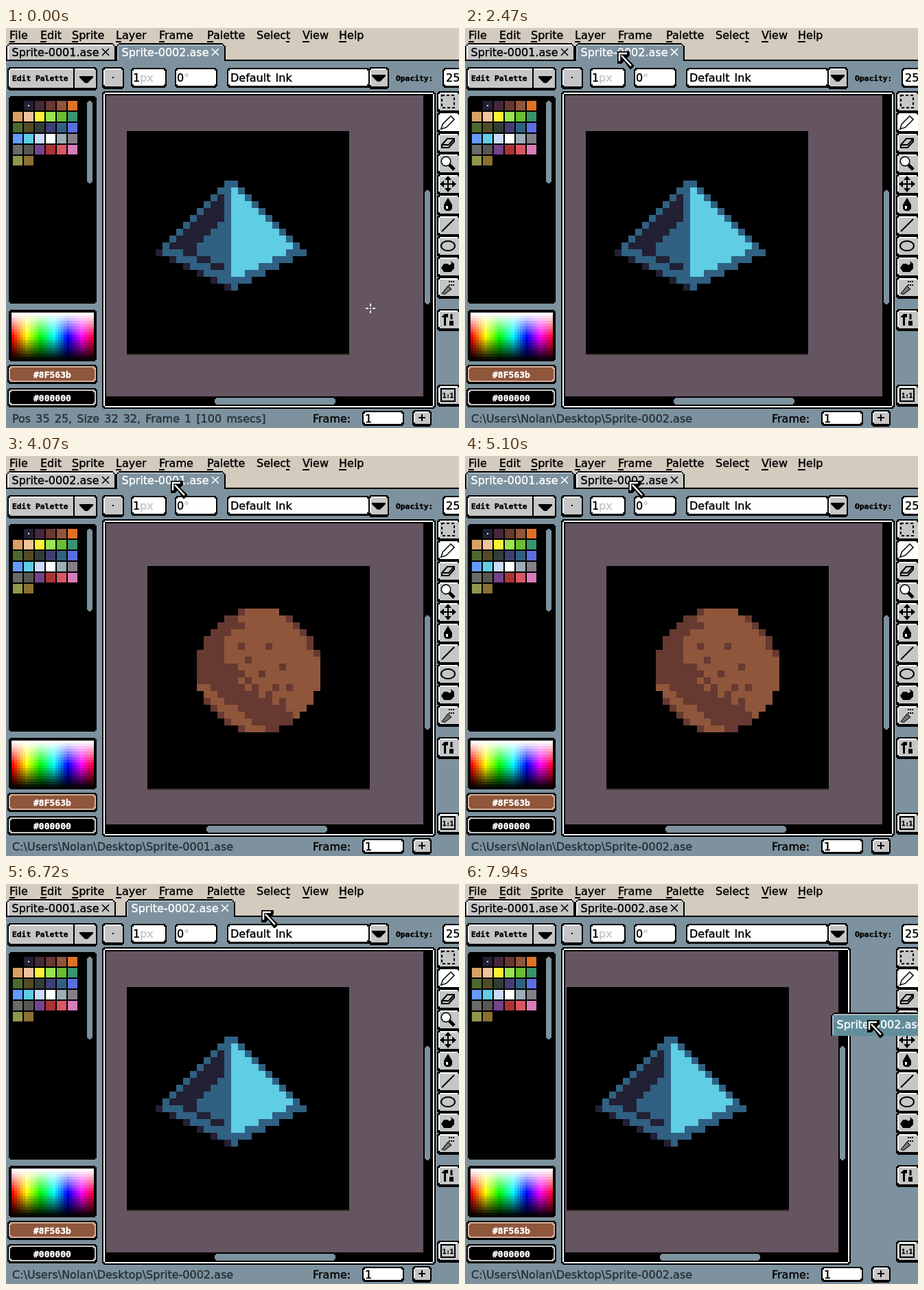
An HTML page with a canvas for the animation above (8 s loop, 660x582 px).

```html
<!DOCTYPE html>
<html lang="en">
<head>
<meta charset="utf-8">
<title>Sprite editor tabs</title>
<style>
html, body { margin: 0; width: 100%; height: 100%; overflow: hidden; background: #7d929e; }
canvas { display: block; }
</style>
</head>
<body>
<canvas id="stage" width="660" height="582"></canvas>
<script>
const LOOP = 8000;
const FACE = '#7d929e', BAR = '#d3cbbe', GREY = '#c6c6c6', WHITE = '#fff', BLACK = '#000';
const UI = '16px "DejaVu Sans", sans-serif';
const SMALL = 'bold 11.3px "DejaVu Sans Mono", monospace';
const stage = document.getElementById('stage');
const screen = stage.getContext('2d');
let g = screen;

// Timeline: cursor path and hard switches
const PATH = [
  [0, 531, 408], [300, 531, 408], [700, 300, 190], [950, 130, 50], [1070, 106, 30],
  [1120, 106, 30], [1220, 102, 36], [1670, 102, 36], [2030, 212, 38], [2170, 215, 36],
  [2420, 215, 36], [2470, 222, 34], [3030, 222, 34], [3400, 80, 36], [3500, 78, 36],
  [3820, 231, 36], [3880, 240, 36], [4320, 240, 36], [4700, 82, 38], [4800, 82, 38],
  [5100, 238, 36], [5450, 240, 38], [5540, 272, 36], [5630, 282, 44], [5810, 282, 44],
  [5950, 316, 64], [5990, 320, 66], [6180, 456, 60], [6340, 213, 34], [6400, 213, 34],
  [6610, 361, 33], [6660, 361, 33], [6720, 372, 38], [6900, 372, 38], [7290, 476, 121],
  [7340, 476, 121], [7700, 560, 182], [7770, 560, 182], [7940, 586, 198], [8000, 586, 198]
];
const ACTIVE = [[0, 2], [1220, 1], [2120, 2], [4070, 1], [5200, 2]];
const HOVER = [[0, 1], [1880, 2], [3720, 1], [4980, 2]];
const DRAGS = [
  { tab: 2, from: 3040, to: 3480, grab: 62 },
  { tab: 1, from: 4330, to: 4780, grab: 80 },
  { tab: 2, from: 6400, to: 6980, grab: 53 }
];
const FLOAT_AT = 6980, MENU_FROM = 5540, MENU_TO = 6200;
const TAB_WIDTH = 160, TAB_TOP = 22;

const clamp = (v, lo, hi) => Math.min(hi, Math.max(lo, v));
const ramp = (t, from, to) => clamp((t - from) / (to - from), 0, 1);
const stepAt = (steps, t) => steps.filter(s => s[0] <= t).pop()[1];

function cursorAt(t) {
  const i = Math.max(1, PATH.findIndex(p => p[0] > t));
  const [t0, x0, y0] = PATH[i - 1], [t1, x1, y1] = PATH[i];
  const k = ramp(t, t0, t1);
  return { x: Math.round(x0 + (x1 - x0) * k), y: Math.round(y0 + (y1 - y0) * k) };
}

// Drawing helpers
function rect(x, y, w, h, color) {
  g.fillStyle = color;
  g.fillRect(x, y, w, h);
}

function rounded(x, y, w, h, color) {
  rect(x + 2, y, w - 4, h, color);
  rect(x, y + 2, w, h - 4, color);
}

function text(s, x, y, color = BLACK, font = UI) {
  g.font = font;
  g.wordSpacing = font === UI ? '2px' : '0px';
  g.fillStyle = g.strokeStyle = color;
  g.lineWidth = 0.4;
  g.fillText(s, x, y);
  g.strokeText(s, x, y);
}

function label(s, x, y, mark = 0, color = BLACK) {
  text(s, x, y, color);
  const left = g.measureText(s.slice(0, mark)).width;
  rect(Math.round(x + left), y + 3, Math.round(g.measureText(s[mark]).width) - 1, 2, color);
}

function button(x, y, w, h, fill = GREY) {
  rounded(x, y, w, h, BLACK);
  rounded(x + 2, y + 2, w - 4, h - 6, WHITE);
  rect(x + 4, y + 4, w - 6, h - 8, fill);
}

function field(x, y, w, h) {
  rounded(x, y, w, h, BLACK);
  rounded(x + 2, y + 2, w - 4, h - 5, WHITE);
}

function thumb(x, y, w, h) {
  rounded(x, y, w, h, FACE);
}

function shape(d, x, y, fill, stroke, width = 2) {
  const p = new Path2D(d);
  g.save();
  g.translate(x, y);
  g.lineWidth = width;
  if (stroke) { g.strokeStyle = stroke; g.stroke(p); }
  if (fill) { g.fillStyle = fill; g.fill(p); }
  g.restore();
}

const arrowDown = (x, y) => shape('M-10-4H10V-2L2 6H-2L-10-2Z', x, y, BLACK);
const cross = (x, y, color) => shape('M-5-5L5 5M5-5L-5 5', x, y, null, color, 1.6);

// Fixed interface
const SWATCHES = `000000 222034 45283c 663931 8f563b df7126 d9a066 eec39a fbf236 99e550 6abe30
 37946e 4b692f 524b24 323c39 3f3f74 306082 5b6ee1 639bff 5fcde4 cbdbfc ffffff 9badb7 847e87
 696a6a 595652 76428a ac3232 d95763 d77bba 8f974a 8a6f30`.split(/\s+/);

const TOOLS = [
  () => { g.setLineDash([4, 3]); shape('M-9-9H9V9H-9Z', 0, 0, null, BLACK); g.setLineDash([]); },
  () => shape('M-9 9L-7 3L4-8L8-4L-3 7ZM-4 0L1 5', 0, 0, WHITE, BLACK, 3),
  () => shape('M-9 3L-1-6H9V-2L1 7H-9ZM-9 3H1L9-6', 0, 0, null, BLACK),
  () => {
    shape('M2 2L9 9', 0, 0, null, BLACK, 5);
    shape('M-9-3A6 6 0 1 0 3-3A6 6 0 1 0-9-3Z', 0, 0, WHITE, BLACK, 3);
  },
  () => {
    shape('M-9 0H9M0-9V9', 0, 0, null, BLACK);
    shape('M0-12L5-6H-5ZM0 12L5 6H-5ZM-12 0L-6-5V5ZM12 0L6-5V5Z', 0, 0, BLACK);
  },
  () => {
    shape('M0-10L6 0V6L3 9H-3L-6 6V0Z', 0, 0, BLACK);
    rect(-3, 2, 3, 4, WHITE);
  },
  () => shape('M-9 9L9-9', 0, 0, null, BLACK),
  () => shape('M-10 0A10 7 0 1 0 10 0A10 7 0 1 0-10 0Z', 0, 0, null, BLACK),
  () => shape('M-10 2L-6-4H-1L2-2L5-4L4-8L9-4V3L4 8H-6Z', 0, 0, BLACK),
  () => {
    shape('M-8 9L0-1L4 3L-5 10Z', 0, 0, '#777', BLACK);
    for (let i = 0; i < 7; i++) rect(1 + i * 3 % 9, -9 + i * 5 % 10, 2, 2, BLACK);
  }
];

function tool(y, draw, fill) {
  button(628, y, 34, 32, fill);
  g.save();
  g.translate(644, y + 15);
  draw();
  g.restore();
}

function drawMenuBar() {
  rect(0, 0, 660, 46, BAR);
  const items = [['File', 5], ['Edit', 50], ['Sprite', 96], ['Layer', 160], ['Frame', 223],
    ['Palette', 293], ['Select', 365, 5], ['View', 432], ['Help', 485]];
  for (const [name, x, mark] of items) label(name, x, 16, mark);
  rect(0, 46, 660, 2, BLACK);
}

function drawOptions() {
  button(2, 57, 131, 34);
  text('Edit Palette', 9, 77, BLACK, SMALL);
  rect(98, 59, 2, 29, BLACK);
  arrowDown(117, 74);
  button(140, 57, 32, 32);
  rect(155, 71, 2, 2, BLACK);
  field(182, 58, 52, 29);
  text('1', 185, 78);
  text('px', 195, 78, '#c4c4c4');
  field(246, 58, 62, 29);
  text('0', 249, 78);
  text('°', 259, 78, '#c4c4c4');
  field(322, 58, 208, 29);
  text('Default Ink', 327, 78);
  button(528, 57, 30, 32);
  arrowDown(543, 72);
  text('Opacity:', 568, 77, BLACK, SMALL);
  field(636, 58, 40, 29);
  text('25', 641, 78);
}

function drawPalette() {
  rounded(4, 99, 128, 302, BLACK);
  SWATCHES.forEach((hex, i) => rect(10 + i % 6 * 16, 106 + (i / 6 | 0) * 16, 14, 14, '#' + hex));
  rect(32, 112, 2, 2, WHITE);
  thumb(118, 106, 8, 120);

  rounded(4, 410, 128, 75, BLACK);
  for (let x = 0; x < 30; x++) {
    for (let y = 0; y < 17; y++) {
      rect(8 + x * 4, 414 + y * 4, 4, 4, `hsl(${x * 12} 100% ${100 - y * 6}%)`);
    }
  }

  [['#8f563b', '#d3b09c', 490], ['#000000', GREY, 524]].forEach(([hex, ring, y]) => {
    rounded(2, y, 131, 28, BLACK);
    rounded(4, y + 2, 127, 23, ring);
    rounded(6, y + 4, 123, 19, hex);
    text(hex.replace('f', 'F'), 40, y + 19, WHITE, 'bold 13px "DejaVu Sans Mono", monospace');
  });
}

function drawTools() {
  TOOLS.forEach((draw, i) => tool(92 + i * 30, draw, i === 1 ? WHITE : GREY));
  tool(409, () => {
    shape('M-9-4L-5-8H0V-3H-3V9H-6V-3H-9Z', 0, 0, BLACK);
    shape('M5-8V0M5 2V9', 0, 0, null, BLACK, 3);
    rect(2, 2, 6, 7, BLACK);
  });
  tool(519, () => {
    shape('M-10-9H10V9H-10Z', 0, 0, null, BLACK);
    text('1:1', -8, 4, BLACK, 'bold 9px "DejaVu Sans Mono", monospace');
  });
}

function drawFrameBox() {
  text('Frame:', 447, 574);
  field(519, 557, 61, 22);
  text('1', 523, 574);
  button(592, 556, 28, 24);
  shape('M-5 0H5M0-5V5', 606, 567, null, BLACK);
}

const base = document.createElement('canvas');
base.width = 660;
base.height = 582;
g = base.getContext('2d');
rect(0, 0, 660, 582, FACE);
drawMenuBar();
drawOptions();
drawPalette();
drawTools();
drawFrameBox();
g = screen;

// Sprites, on a 32 by 32 grid of ten pixel cells
const cells = (from, to, row, color) => rect(from * 10, row * 10, (to - from + 1) * 10, 10, color);

function drawPyramid() {
  const dark = '#222034', blue = '#306082', cyan = '#5fcde4';
  cells(14, 15, 7, blue);
  for (let r = 8; r <= 16; r++) {
    cells(21 - r, r + 8, r, blue);
    cells(22 - r, Math.min(13, 25 - r), r, dark);
    cells(15, r + 7, r, cyan);
  }
  for (let r = 17; r <= 22; r++) {
    cells(2 * r - 30, 2 * r - 30, r, dark);
    cells(2 * r - 29, 59 - 2 * r, r, blue);
    if (r < 20) cells(2 * r - 26, 2 * r - 25, r, dark);
    if (r < 21) cells(15, 56 - 2 * r, r, cyan);
  }
}

const SHADE_END = [13, 12, 12, 11, 10, 10, 10, 10, 11, 12, 12, 13, 15, 17, 19, 20, 20, 18];
const CRATERS = '13,8 13,11 17,11 14,13 12,14 19,14 13,15 16,15 14,16 15,17 18,17 20,17 17,18 19,19';

function drawPlanet() {
  const dark = '#663931', light = '#8f563b';
  SHADE_END.forEach((end, i) => {
    const r = i + 6;
    const half = Math.round(Math.sqrt(81 - (r - 14.5) ** 2));
    const left = 16 - half, right = 15 + half;
    cells(left, right, r, light);
    cells(left, end, r, dark);
    if (r > 6 && r < 13) cells(right, right, r, dark);
    if (r > 16) cells(r - 10 + (r > 22), r - 9 + (r > 19) + (r > 22), r, light);
  });
  for (const c of CRATERS.split(' ')) {
    const [x, y] = c.split(',').map(Number);
    cells(x, x, y, dark);
  }
}

// Moving parts
function drawEditor(sprite, topDock, rightDock) {
  const planet = sprite === 1;
  const top = 92 + Math.round(64 * topDock), right = 626 - Math.round(64 * rightDock);
  rounded(140, top, right - 140, 554 - top, BLACK);
  rounded(142, top + 2, right - 144, 550 - top, WHITE);
  rect(144, top + 4, right - 148, 546 - top, BLACK);
  rect(146, top + 6, right - 164, 530 - top, '#655561');

  const x = (planet ? 206 : 176) + Math.round(4 * topDock - 28 * rightDock);
  const y = (planet ? 160 : 150) + Math.round(32 * topDock);
  g.save();
  g.beginPath();
  g.rect(146, top + 6, right - 164, 530 - top);
  g.clip();
  rect(x, y, 324, 324, BLACK);
  rect(x, y + 324, 324, 2, '#40362c');
  g.translate(x + 2, y + 2);
  planet ? drawPlanet() : drawPyramid();
  g.restore();

  thumb(right - 16, (planet ? 232 : 236) + Math.round(46 * topDock), 8, 166 - Math.round(30 * topDock));
  thumb((planet ? 292 : 304) - Math.round(2 * topDock + 20 * rightDock), 538,
    176 - Math.round(30 * rightDock), 10);
}

function drawTab(id, x, y, mode) {
  const floating = mode === 'float', plain = mode === 'plain';
  const height = floating ? 34 : 26;
  const fill = { plain: GREY, active: FACE, float: '#628e9c' }[mode];
  const ink = plain ? BLACK : WHITE, shine = plain ? WHITE : '#a9b8c0';
  const drop = floating ? 4 : 0;
  rect(x + 4, y, TAB_WIDTH - 8, 2, BLACK);
  rect(x + 2, y + 2, TAB_WIDTH - 4, 2, BLACK);
  rect(x, y + 4, TAB_WIDTH, height - 4, BLACK);
  rect(x + 4, y + 2, TAB_WIDTH - 8, 2, shine);
  rect(x + 2, y + 4, TAB_WIDTH - 4, height - (plain ? 6 : 4), fill);
  rect(x + 2, y + 4, 2, height - 6, shine);
  text(`Sprite-000${id}.ase`, x + 8.5, y + 19 + drop, ink);
  cross(x + 145, y + 13 + drop, ink);
}

function drawTabs(t, pointer) {
  const swapped = ramp(t, 3240, 3340) - ramp(t, 4512, 4612);
  const place = { 1: TAB_WIDTH * swapped, 2: TAB_WIDTH * (1 - swapped) };
  const drag = DRAGS.find(d => t >= d.from && t < d.to);
  const active = t < FLOAT_AT ? stepAt(ACTIVE, t) : 0;
  if (drag) place[drag.tab] = clamp(pointer.x - drag.grab, 0, 174);
  const order = active === 1 ? [2, 1] : [1, 2];
  for (const id of order) {
    drawTab(id, Math.round(place[id]), TAB_TOP, id === active ? 'active' : 'plain');
  }
}

function drawMenu(pointer) {
  rect(272, 36, 180, 108, BLACK);
  rect(274, 38, 176, 104, WHITE);
  rect(276, 40, 174, 102, BAR);
  const items = [['Close', 57, 0], ['Duplicate View', 80, 0], ['Open with OS', 109, 0], ['Open in Folder', 131, 8]];
  for (const [name, y, mark] of items) {
    const lit = pointer.x > 276 && pointer.x < 448 && pointer.y >= y - 16 && pointer.y < y + 6;
    if (lit) rect(278, y - 16, 168, 22, FACE);
    label(name, 295, y, mark, lit ? WHITE : BLACK);
  }
  for (let x = 278; x < 446; x += 6) rect(x, 90, 4, 2, '#a9806f');
}

function drawCursor({ x, y }, onCanvas) {
  if (onCanvas) {
    shape('M-7 0H-3M3 0H7M0-7V-3M0 3V7M-1 0H1', x, y, null, WHITE);
  } else {
    shape('M0 0H18V6L14 10L24 20V22L20 26H18L10 14L6 18H0Z', x, y, BLACK);
    shape('M3 14V3H14M6 6L20 21', x, y, null, WHITE, 2.5);
  }
}

function draw(t) {
  const pointer = cursorAt(t);
  const onCanvas = t < 1070 && pointer.x > 146 && pointer.y > 98;
  g.drawImage(base, 0, 0);
  drawEditor(stepAt(ACTIVE, t), ramp(t, 7000, 7120) - ramp(t, 7560, 7660), ramp(t, 7770, 7930));
  drawTabs(t, pointer);

  const col = Math.floor((pointer.x - 178) / 10), row = Math.floor((pointer.y - 152) / 10);
  text(onCanvas
    ? `Pos ${col} ${row}, Size 32 32, Frame 1 [100 msecs]`
    : `C:\\Users\\Nolan\\Desktop\\Sprite-000${stepAt(HOVER, t)}.ase`, 9, 574, '#263038');

  if (t >= MENU_FROM && t < MENU_TO) drawMenu(pointer);
  if (t >= FLOAT_AT) drawTab(2, pointer.x - 53, pointer.y - 11, 'float');
  drawCursor(pointer, onCanvas);
}

const start = performance.now();
function tick() {
  draw((performance.now() - start) % LOOP);
  requestAnimationFrame(tick);
}
tick();
</script>
</body>
</html>
```
